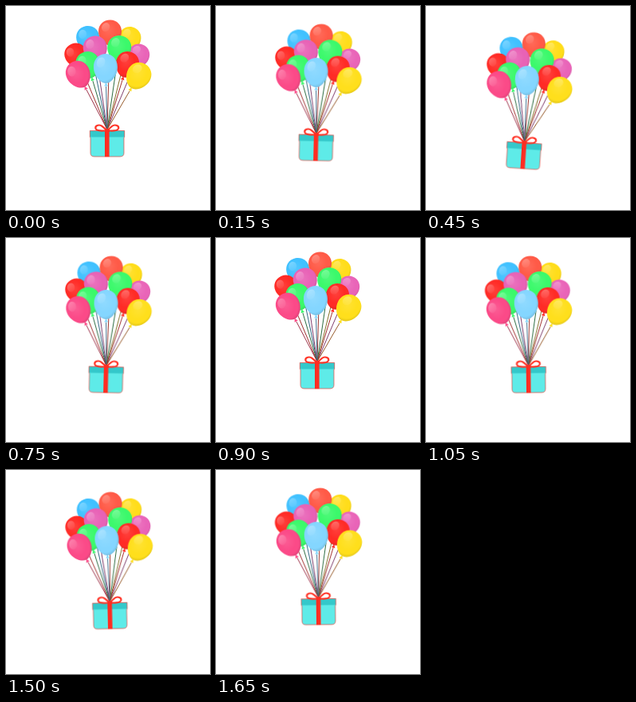
An HTML page for the animation above (1.8 s loop, 256 by 256 pixels).

```html
<!DOCTYPE html>
<html lang="en">
<head>
<meta charset="utf-8">
<title>Balloon gift</title>
<style>
  html, body { margin: 0; width: 100%; height: 100%; overflow: hidden; background: #fff; }
  svg { display: block; width: 100vw; height: 100vh; }
  /* Each quarter of the loop advances in three held poses. */
  #float {
    transform-origin: 128px 104px;
    animation: float 1800ms steps(3, end) -1ms infinite;
  }
  @keyframes float {
    0%, 50%, 100% { transform: translate(0, 0) rotate(0deg); }
    25% { transform: translate(0, 15.3px) rotate(3.8deg); }
    75% { transform: translate(3.2px, 15.3px) rotate(-1.9deg); }
  }
</style>
</head>
<body>
<svg viewBox="0 0 256 256">
  <defs>
    <radialGradient id="shade" cx=".42" cy=".4" r=".62">
      <stop offset="0" stop-color="#fff" stop-opacity=".1"/>
      <stop offset=".6" stop-color="#fff" stop-opacity="0"/>
      <stop offset=".8" stop-color="#000" stop-opacity="0"/>
      <stop offset="1" stop-color="#000" stop-opacity=".12"/>
    </radialGradient>
    <linearGradient id="shine" x1="0" y1="0" x2="1" y2="1">
      <stop offset="0" stop-color="#fff" stop-opacity=".34"/>
      <stop offset="1" stop-color="#fff" stop-opacity="0"/>
    </linearGradient>
  </defs>
  <g id="float">
    <g id="strings" fill="none" stroke-width="1"></g>
    <g id="balloons"></g>
    <g id="gift">
      <path d="M106 163H148V184.5Q148 189 143 189H111Q106 189 106 184.5Z" fill="#5eebe8"/>
      <path d="M105.2 156.5H148.8V164.5H105.2Z" fill="#34c8ca"/>
      <path d="M105.3 156.5H148.7V164.5L148 165V184.5Q148 189 143 189H111Q106 189 106 184.5V165L105.3 164.5Z"
            fill="none" stroke="#e83f38" stroke-width=".9" stroke-opacity=".75"/>
      <path d="M124 156H129.6V189.2H124Z" fill="#ff2d22"/>
      <g fill="none" stroke="#ff3427" stroke-width="2.2" stroke-linejoin="round">
        <path d="M126.5 156C121 157 113.5 157 112.4 153.5C111.6 149.5 117.7 148.4 120.5 150.8C122.2 152.4 124.5 154 126.5 156Z"/>
        <path d="M127.3 156C132.5 157 140 157 141.2 153.5C142 149.5 135.8 148.4 133.2 150.8C131.5 152.4 129.2 154 127.3 156Z"/>
      </g>
      <path d="M124 154.3H130V158H124Z" fill="#ff2d22"/>
    </g>
  </g>
</svg>
<script>
  const NS = 'http://www.w3.org/2000/svg';
  const tie = { x: 127, y: 155 };

  // x, y, half width, half height, colour, string colour; back to front
  const balloons = [
    [103, 41, 14.5, 16, '#40c1ff', '#2f6684'],
    [155, 42, 14, 16, '#ffdd1a', '#84722a'],
    [130.5, 33.5, 14.5, 16, '#ff5a47', '#a03c34'],
    [88, 62, 14, 15.5, '#ff2b26', '#a02d2c'],
    [166, 63, 13.5, 15.5, '#e964b8', '#7f3d6c'],
    [112, 54, 15, 16.5, '#e862b6', '#7f3d6c'],
    [142, 53.5, 15, 16.5, '#3bf96b', '#2c6b40'],
    [103, 74, 15, 17, '#3bf96b', '#2c6b40'],
    [152, 73.5, 14.5, 16.5, '#ff2b26', '#a02d2c'],
    [125, 78.5, 15, 18.5, '#84d6ff', '#3f7190'],
    [91, 86, 15, 17.5, '#fb4a88', '#9c3048'],
    [166, 88, 15.3, 17.5, '#ffdf1c', '#965a2a']
  ];

  function add(parent, tag, attrs) {
    const el = document.createElementNS(NS, tag);
    for (const key in attrs) el.setAttribute(key, attrs[key]);
    return parent.appendChild(el);
  }

  function egg(w, h) {
    return `M0 ${-h}C${w * .58} ${-h} ${w} ${-h * .62} ${w} ${-h * .1}` +
      `C${w} ${h * .48} ${w * .45} ${h} 0 ${h}` +
      `C${-w * .45} ${h} ${-w} ${h * .48} ${-w} ${-h * .1}` +
      `C${-w} ${-h * .62} ${-w * .58} ${-h} 0 ${-h}Z`;
  }

  const strings = document.getElementById('strings');
  const bunch = document.getElementById('balloons');

  for (const [x, y, w, h, fill, stroke] of balloons) {
    const lean = Math.atan2(x - tie.x, tie.y - y);
    const reach = h + 4;
    const knotX = x - Math.sin(lean) * reach;
    const knotY = y + Math.cos(lean) * reach;
    add(strings, 'path', { d: `M${knotX} ${knotY}L${tie.x} ${tie.y}`, stroke });

    const g = add(bunch, 'g', {
      transform: `translate(${x} ${y}) rotate(${lean * 180 / Math.PI})`
    });
    const d = egg(w, h);
    add(g, 'path', { d: `M0 ${h - 1}L2.3 ${h + 3.5}H-2.3Z`, fill });
    add(g, 'path', { d, fill });
    add(g, 'path', { d, fill: 'url(#shade)' });
    add(g, 'ellipse', {
      cx: -w * .38, cy: -h * .42, rx: w * .34, ry: h * .36,
      transform: `rotate(25 ${-w * .38} ${-h * .42})`, fill: 'url(#shine)'
    });
  }
</script>
</body>
</html>
```
